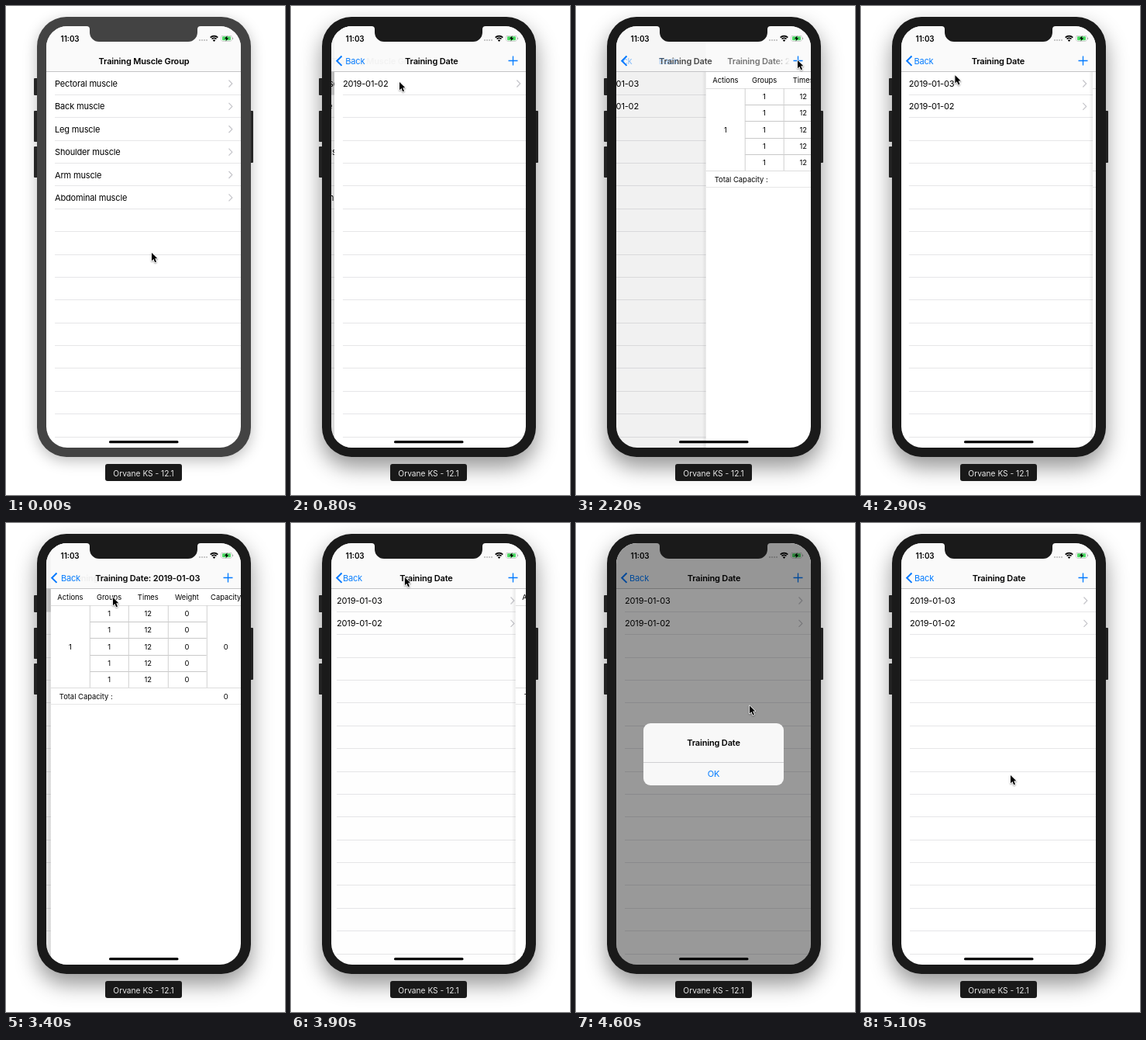
Animation, 360 px wide and 630 px high, one loop 5.3 s. Source, as an HTML page with a canvas:

```html
<!DOCTYPE html>
<html lang="en">
<head>
<meta charset="utf-8">
<title>Training log</title>
<style>
html, body { margin: 0; width: 100%; height: 100%; overflow: hidden; background: #fff; }
canvas { display: block; }
</style>
</head>
<body>
<canvas id="stage" width="360" height="630"></canvas>
<script>
const ctx = document.getElementById('stage').getContext('2d');
const LOOP = 5300, TICK = 100, SLIDE = 400;
const LEFT = 52, TOP = 26, RIGHT = 303, BOTTOM = 569, WIDTH = RIGHT - LEFT, NAV = 85;
const BLUE = '#007aff';

const list = (title, rows, nested) => ({ title, rows, nested });
const groups = list('Training Muscle Group',
  ['Pectoral', 'Back', 'Leg', 'Shoulder', 'Arm', 'Abdominal'].map(n => n + ' muscle'), false);
const oneDate = list('Training Date', ['2019-01-02'], true);
const twoDates = list('Training Date', ['2019-01-03', '2019-01-02'], true);
const log = date => ({ title: 'Training Date: ' + date, nested: true });
const first = log('2019-01-02'), second = log('2019-01-03');

// start time, page below, page on top, push or pop, first row selected
const slides = [
  [500, groups, oneDate, true, true],
  [1164, oneDate, first, true, true],
  [1620, oneDate, first, false, true],
  [2109, twoDates, second, true, false],
  [2600, twoDates, second, false, false],
  [3114, twoDates, second, true, true],
  [3650, twoDates, second, false, true]
];

// time, x, y of the pointer tip
const pointer = [
  [200, 188, 318], [500, 140, 98], [900, 140, 98], [1000, 146, 98], [1300, 146, 98],
  [1600, 74, 70], [1700, 74, 70], [2000, 286, 70], [2200, 286, 70], [2500, 74, 70],
  [2700, 74, 70], [3000, 138, 96], [3400, 138, 96], [3600, 74, 70], [3700, 74, 70],
  [4200, 281, 70], [4300, 281, 70], [4800, 193, 325], [LOOP, 193, 325]
];

const clamp = v => Math.min(1, Math.max(0, v));
const mix = (a, b, k) => a + (b - a) * k;

function rect(x, y, w, h, color) {
  ctx.fillStyle = color;
  ctx.fillRect(x, y, w, h);
}

function round(x, y, w, h, r, color) {
  ctx.beginPath();
  ctx.roundRect(x, y, w, h, r);
  ctx.fillStyle = color;
  ctx.fill();
}

function stroke(path, color, width) {
  ctx.strokeStyle = color;
  ctx.lineWidth = width;
  ctx.stroke(new Path2D(path));
}

function text(s, x, y, { size = 11, weight = 400, color = '#000', align = 'left', alpha = 1 } = {}) {
  ctx.save();
  ctx.globalAlpha *= alpha;
  ctx.font = `${weight} ${size}px Inter, sans-serif`;
  ctx.letterSpacing = size === 11 ? '-0.16px' : '0px';
  ctx.textAlign = align;
  ctx.fillStyle = color;
  ctx.fillText(s, x, y);
  ctx.restore();
}

function drawList(page, selected) {
  rect(LEFT, NAV, WIDTH, 29, `rgba(217,217,217,${selected})`);
  for (let i = 1; i <= 16; i++) rect(63, Math.floor(NAV + i * 29.38), RIGHT - 63, 1, '#e6e6e8');
  page.rows.forEach((row, i) => {
    const y = 100 + i * 29.38;
    text(row, 63, y + 4);
    stroke(`M287.5 ${y - 4.5}l4.3 4.5l-4.3 4.5`, '#c7c7cc', 1.3);
  });
}

function drawLog() {
  const col = WIDTH / 5, row = 21.2, top = 106;
  const cell = (s, c, y) => text(s, LEFT + (c + 0.5) * col, y + 3.5, { size: 9.4, align: 'center' });
  ['Actions', 'Groups', 'Times', 'Weight', 'Capacity'].forEach((s, c) => cell(s, c, 95.5));
  rect(LEFT, top, WIDTH, 1, '#dedede');
  for (let i = 0; i < 5; i++) {
    const y = top + (i + 0.5) * row;
    ['1', '12', '0'].forEach((s, c) => cell(s, c + 1, y));
    if (i) rect(LEFT + col, Math.round(top + i * row), col * 3, 1, '#c9c9c9');
  }
  for (let c = 1; c < 5; c++) rect(LEFT + Math.round(c * col), top, 1, 106, '#d0d0d0');
  cell('1', 0, 159);
  cell('0', 4, 159);
  rect(LEFT, 212, WIDTH, 1, '#dedede');
  text('Total Capacity :', 63, 227, { size: 9.4 });
  cell('0', 4, 223.5);
  rect(LEFT, 233, WIDTH, 1, '#e6e6e6');
}

function drawPage(page, x, selected = 0) {
  ctx.save();
  ctx.translate(x, 0);
  rect(LEFT, TOP, WIDTH, BOTTOM - TOP, '#fff');
  page.rows ? drawList(page, selected) : drawLog();
  ctx.restore();
}

function drawNav(below, above, p) {
  const edge = (1 - p) * WIDTH;
  rect(LEFT, TOP, WIDTH, NAV - TOP, '#fafafa');
  if (p > 0 && p < 1) rect(LEFT, TOP, edge, NAV - TOP, `rgba(0,0,0,${0.03 * p})`);
  rect(LEFT, NAV - 1, WIDTH, 1, '#c4c4c6');

  const fade = ctx.createLinearGradient(256, 0, 276, 0);
  fade.addColorStop(0, '#000');
  fade.addColorStop(1, 'rgba(0,0,0,0)');
  const title = { weight: 600, align: 'center', color: fade };
  text(below.title, 178 - 68 * p, 74.5, { ...title, alpha: 1 - p * p });
  text(above.title, 178.5 + 183 * (1 - p), 74.5, { ...title, alpha: p });

  ctx.save();
  ctx.beginPath();
  ctx.rect(61, TOP, WIDTH, 60);
  ctx.clip();
  if (below.nested) text('Back', 69 - 40 * p, 74.5, { color: BLUE, alpha: 1 - p });
  text('Back', 69 + 82 * (1 - p), 74.5, { color: BLUE, alpha: p * p });
  ctx.restore();

  ctx.save();
  ctx.globalAlpha = below.nested ? 1 : p;
  stroke('M65.5 64.5l-6.3 6.2l6.3 6.2', BLUE, 2);
  stroke('M280.5 70.5h12M286.5 64.5v12', BLUE, 1.3);
  ctx.restore();
}

function drawStatus() {
  text('11:03', 70.5, 45.5, { size: 9.8, weight: 600 });
  for (let i = 0; i < 4; i++) round(249 + i * 3, 43, 2, 2, 1, '#b9b9b9');
  [[6.8, 1.8], [4.2, 1.7]].forEach(([r, w]) => {
    ctx.beginPath();
    ctx.arc(268.5, 45.5, r, -2.35, -0.79);
    ctx.strokeStyle = '#000';
    ctx.lineWidth = w;
    ctx.stroke();
  });
  ctx.fillStyle = '#000';
  ctx.fill(new Path2D('M268.5 46l-1.8-2q1.8-1.3 3.6 0z'));
  round(277.5, 38, 14, 7.5, 2, '#a9a9a9');
  round(278, 38.5, 13, 6.5, 1.6, '#fff');
  round(279, 39.3, 11, 5, 1, '#4cd964');
  round(292.2, 40.5, 1, 2.6, 0.5, '#a9a9a9');
  ctx.fillStyle = '#000';
  ctx.fill(new Path2D('M285.6 38.3l-3.8 4h2.4l-.7 3.2l3.8-4.2h-2.3z'));
}

function drawScreen(t) {
  const [start, below, above, push, select] = slides.findLast(s => s[0] <= t) || slides[0];
  const eased = 1 - (1 - clamp((t - start) / SLIDE)) ** 3;
  const p = push ? eased : 1 - eased;
  const selected = !select || t < start ? 0 : push ? 1 : p;
  const x = (1 - p) * WIDTH;

  if (p < 1) {
    drawPage(below, -0.3 * WIDTH * p, selected);
    rect(LEFT, NAV, WIDTH, BOTTOM - NAV, `rgba(0,0,0,${0.1 * p})`);
  }
  if (p > 0) {
    if (p < 1) {
      const shade = ctx.createLinearGradient(LEFT + x - 5, 0, LEFT + x, 0);
      shade.addColorStop(0, 'rgba(0,0,0,0)');
      shade.addColorStop(1, 'rgba(0,0,0,.08)');
      rect(LEFT + x - 5, NAV, 5, BOTTOM - NAV, shade);
    }
    drawPage(above, x);
  }
  drawNav(below, above, p);
  drawStatus();
  round(133, 560, 89.5, 3.3, 1.6, '#000');
}

function drawAlert(t) {
  const alpha = clamp(Math.min(t - 4300, 5100 - t) / 200);
  if (!alpha) return;
  ctx.save();
  ctx.globalAlpha = alpha;
  rect(LEFT, TOP, WIDTH, BOTTOM - TOP, 'rgba(0,0,0,.4)');
  round(87, 258, 181, 80, 9, '#f8f8f8');
  rect(87, 308, 181, 1, '#d0d0d2');
  text('Training Date', 177.5, 287, { weight: 600, align: 'center' });
  text('OK', 177.5, 327, { color: BLUE, align: 'center' });
  ctx.restore();
}

function drawPhone(active) {
  const body = active ? '#1a1a1a' : '#434343';
  round(36, 93, 8, 22, 1, '#2b2b2b');
  round(36, 135, 8, 40, 1, '#2b2b2b');
  round(36, 181, 8, 40, 1, '#2b2b2b');
  round(311, 135, 8, 67, 1, '#2b2b2b');
  ctx.save();
  ctx.shadowColor = active ? 'rgba(0,0,0,.42)' : 'rgba(0,0,0,.26)';
  ctx.shadowBlur = active ? 28 : 18;
  ctx.shadowOffsetY = active ? 13 : 5;
  round(40, 14, 276, 567, 38, body);
  ctx.restore();
  round(128, 590, 99, 22, 3, '#191919');
  text('Orvane KS - 12.1', 177.5, 605.5, { size: 10.2, color: '#e8e8e8', align: 'center' });
  return body;
}

function drawPointer(t) {
  const i = Math.max(1, pointer.findIndex(k => k[0] >= t));
  const [t0, x0, y0] = pointer[i - 1], [t1, x1, y1] = pointer[i];
  const k = clamp((t - t0) / (t1 - t0)), s = k * k * (3 - 2 * k);
  ctx.save();
  ctx.translate(mix(x0, x1, s), mix(y0, y1, s));
  const arrow = new Path2D('M0 0V10.2L2.4 8L4.2 12.2L6 11.4L4.2 7.3H7.3Z');
  ctx.lineJoin = 'round';
  ctx.lineWidth = 1.6;
  ctx.strokeStyle = '#fff';
  ctx.shadowColor = 'rgba(0,0,0,.4)';
  ctx.shadowBlur = 2;
  ctx.shadowOffsetY = 1;
  ctx.stroke(arrow);
  ctx.shadowColor = 'transparent';
  ctx.fillStyle = '#000';
  ctx.fill(arrow);
  ctx.restore();
}

function draw(now) {
  const t = Math.floor(now % LOOP / TICK) * TICK;
  rect(0, 0, 360, 630, '#fff');
  const body = drawPhone(t >= 400);
  ctx.save();
  ctx.beginPath();
  ctx.roundRect(LEFT, TOP, WIDTH, BOTTOM - TOP, 27);
  ctx.clip();
  drawScreen(t);
  drawAlert(t);
  ctx.restore();
  ctx.fillStyle = body;
  ctx.fill(new Path2D('M104 25V26q4 0 4 4v4a12 12 0 0 0 12 12H235a12 12 0 0 0 12-12v-4q0-4 4-4V25z'));
  drawPointer(t);
}

const begin = performance.now();
function loop() {
  draw(performance.now() - begin);
  requestAnimationFrame(loop);
}
loop();
</script>
</body>
</html>
```
